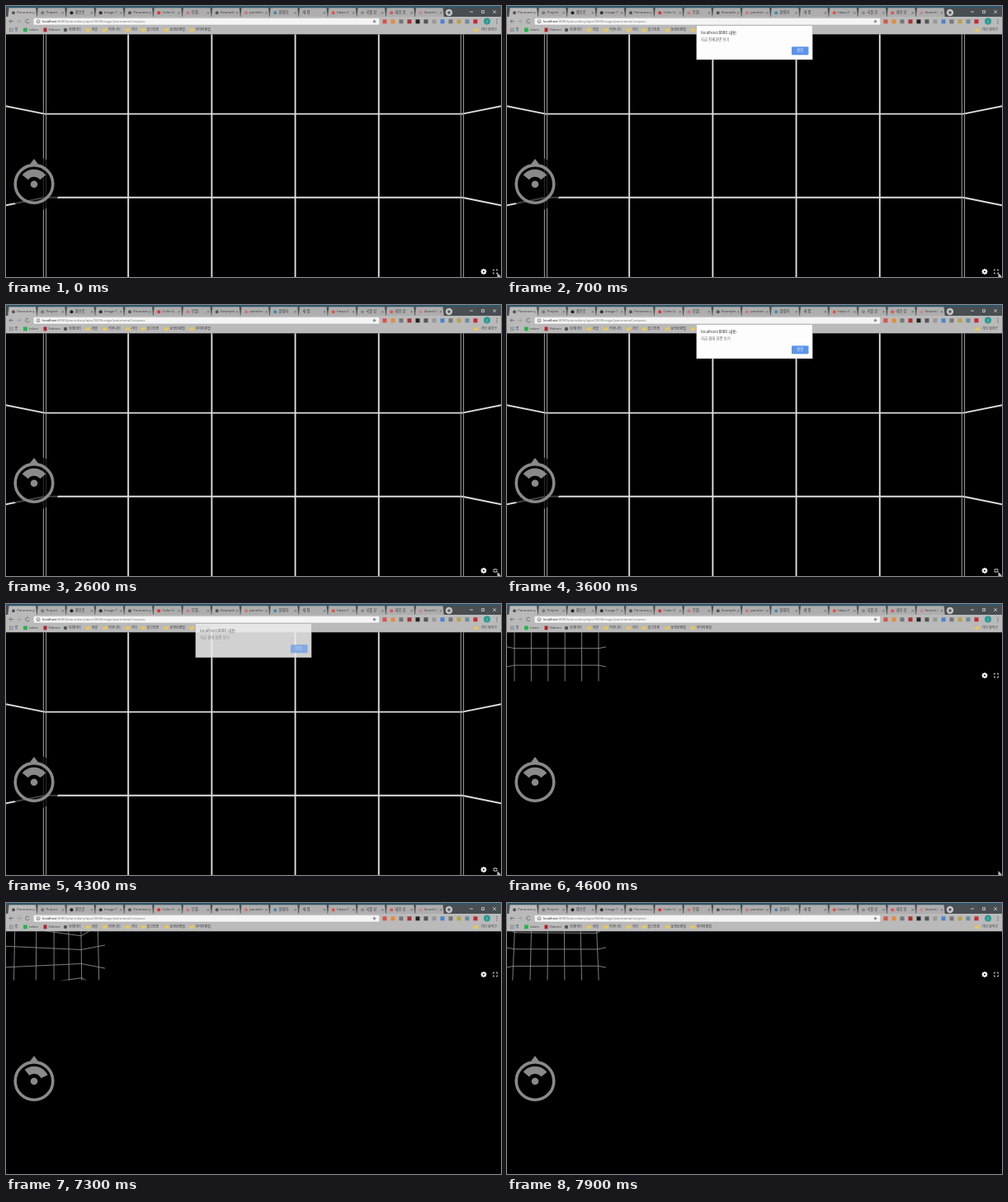
These frames come from a looping animation (600x328 px, 8 s). An HTML page with a canvas:

```html
<!DOCTYPE html>
<html lang="ko">
<head>
<meta charset="utf-8">
<title>Panorama viewer</title>
<style>
html, body { margin: 0; width: 100%; height: 100%; overflow: hidden; background: #000; }
canvas { display: block; width: 600px; height: 328px; }
</style>
</head>
<body>
<canvas id="stage" width="600" height="328"></canvas>
<script>
const ctx = document.getElementById('stage').getContext('2d');
const LOOP = 8000;
const STEP = 100;
const FONT = '"Open Sans", "Noto Sans CJK KR", "Noto Sans CJK", sans-serif';

const clamp = v => Math.max(0, Math.min(1, v));
const ramp = (t, from, to) => clamp((t - from) / (to - from));

function rect(x, y, w, h, color) {
  ctx.fillStyle = color;
  ctx.fillRect(x, y, w, h);
}

function disc(x, y, r, color) {
  ctx.fillStyle = color;
  ctx.beginPath();
  ctx.arc(x, y, r, 0, Math.PI * 2);
  ctx.fill();
}

function poly(points, color) {
  ctx.fillStyle = color;
  ctx.beginPath();
  points.forEach(([x, y]) => ctx.lineTo(x, y));
  ctx.closePath();
  ctx.fill();
}

function line(points, color, width) {
  ctx.strokeStyle = color;
  ctx.lineWidth = width;
  ctx.beginPath();
  points.forEach(([x, y], i) => i ? ctx.lineTo(x, y) : ctx.moveTo(x, y));
  ctx.stroke();
}

function arc(x, y, r, from, to, color, width) {
  ctx.strokeStyle = color;
  ctx.lineWidth = width;
  ctx.beginPath();
  ctx.arc(x, y, r, from, to);
  ctx.stroke();
}

function round(x, y, w, h, r, color) {
  ctx.fillStyle = color;
  ctx.beginPath();
  ctx.roundRect(x, y, w, h, r);
  ctx.fill();
}

function text(str, x, y, size, color, align = 'left') {
  ctx.font = `${size}px ${FONT}`;
  ctx.textAlign = align;
  ctx.textBaseline = 'middle';
  ctx.fillStyle = color;
  ctx.fillText(str, x, y);
}

// Browser window

const TABS = [
  ['Panoram', '#555'], ['Project', '#777'], ['웹프로', '#222'], ['Image T', '#333'],
  ['Panoram', '#555'], ['Color U', '#d33'], ['모델 - ', '#c77'], ['Example', '#555'],
  ['panolen', '#c77'], ['알림차', '#48a'], ['새 탭', null], ['https://', '#d54'],
  ['국룰 상', '#888'], ['데모 상', '#d55'], ['Search I', '#c88']
];

function drawTabs() {
  rect(0, 0, 600, 2, '#2b566e');
  rect(0, 2, 600, 11.5, '#484e52');

  TABS.forEach(([label, icon], i) => {
    const x = 2 + i * 35.25;
    poly([[x, 13.5], [x + 1.4, 2], [x + 34.2, 2], [x + 35.6, 13.5]], '#747474');
    poly([[x + 0.5, 13.5], [x + 1.7, 2.5], [x + 33.9, 2.5], [x + 35.1, 13.5]], i ? '#aeaeae' : '#bababa');
    if (icon) disc(x + 7, 8.3, 2, icon);
    text(label, x + (icon ? 11.2 : 5), 8.3, 4.3, '#3a3a3a');
    const cx = x + 31.5;
    line([[cx - 1.2, 7.1], [cx + 1.2, 9.5]], '#555', 0.6);
    line([[cx + 1.2, 7.1], [cx - 1.2, 9.5]], '#555', 0.6);
  });

  disc(537, 8, 4.2, '#c4c4c4');
  line([[535, 8], [539, 8]], '#333', 0.9);
  line([[537, 6], [537, 10]], '#333', 0.9);
  line([[562, 7], [566, 7]], '#ddd', 0.8);
  ctx.strokeStyle = '#ddd';
  ctx.lineWidth = 0.8;
  ctx.strokeRect(576.7, 5.7, 2.8, 2.8);
  line([[590.3, 5.2], [594, 8.9]], '#ddd', 0.8);
  line([[594, 5.2], [590.3, 8.9]], '#ddd', 0.8);
}

function drawToolbar() {
  rect(0, 13, 600, 21.3, '#bababa');
  line([[9, 18.5], [4, 18.5], [6.3, 16.2]], '#666', 0.8);
  line([[4, 18.5], [6.3, 20.8]], '#666', 0.8);
  line([[13, 18.5], [18, 18.5], [15.7, 16.2]], '#999', 0.8);
  line([[18, 18.5], [15.7, 20.8]], '#999', 0.8);
  arc(26, 18.5, 2.3, 0.3, 5.5, '#666', 0.8);

  round(33, 14.2, 420, 9, 1.2, '#aaa');
  round(33.5, 14.7, 419, 8, 1, '#f4f4f4');
  arc(39, 18.7, 2, 0, Math.PI * 2, '#666', 0.7);
  line([[39, 18.2], [39, 20]], '#666', 0.6);
  const host = 'localhost';
  text(host, 44, 18.8, 4.25, '#222');
  const hostEnd = 44 + ctx.measureText(host).width;
  text(':8080/pianodiary/ajax/3600image/panoramaCompass', hostEnd, 18.8, 4.25, '#777');

  const star = Array.from({ length: 10 }, (_, i) => {
    const a = i * Math.PI / 5 - Math.PI / 2, r = i % 2 ? 1.1 : 2.6;
    return [446.5 + r * Math.cos(a), 18.7 + r * Math.sin(a)];
  });
  poly(star, '#888');

  const badges = ['#d65448', '#e58a3c', '#777', '#a33', '#222', '#555',
    '#999', '#4a83d0', '#777', '#b9a04a', '#6c8b9c', '#c22a35'];
  badges.forEach((c, i) => rect(456.5 + i * 10, 16.3, 5, 5, c));
  disc(583, 18.5, 4, '#2b9a94');
  text('J', 583, 18.5, 4, '#fff', 'center');
  [16.3, 18.6, 20.9].forEach(y => disc(595, y, 0.65, '#555'));
}

function drawFolder(x) {
  rect(x, 26.6, 2.4, 1, '#d1a936');
  rect(x, 27.2, 4.6, 3.8, '#e9c75a');
}

function drawBookmarks() {
  const mark = (label, x) => text(label, x, 29, 4, '#3a3a3a');
  for (let i = 0; i < 9; i++)
    rect(4 + (i % 3) * 1.7, 26.6 + Math.floor(i / 3) * 1.7, 1.2, 1.2, ['#c55', '#5a8', '#58b'][i % 3]);
  mark('앱', 10.5);
  rect(21, 26.5, 4.8, 4.8, '#25b34b');
  mark('tolum', 28);
  rect(45.5, 26.5, 4, 4.8, '#b3202a');
  mark('Vidoren', 51.5);
  disc(72, 29, 2.2, '#555');
  mark('위데이터', 76);
  [['개발', 97], ['커뮤니티', 117.5], ['기타', 145], ['알고리즘', 164],
    ['동영상편집', 192], ['이미지편집', 223]].forEach(([label, x]) => {
    drawFolder(x);
    mark(label, x + 6.5);
  });
  drawFolder(567.5);
  mark('기타 북마크', 575.5);
}

// Panorama: a square room with a five-cell grid on each wall

const HALF = 2.5;

function drawRoom(view, yaw, pitch) {
  const { cx, cy, focal, box, color, width } = view;
  const project = ([x, y, z]) => {
    const rx = x * Math.cos(yaw) - z * Math.sin(yaw);
    const rz = x * Math.sin(yaw) + z * Math.cos(yaw);
    const ry = y * Math.cos(pitch) - rz * Math.sin(pitch);
    const depth = y * Math.sin(pitch) + rz * Math.cos(pitch);
    return [cx + focal * rx / depth, cy - focal * ry / depth];
  };
  const edge = (a, b, c = color, w = width) => line([project(a), project(b)], c, w);

  ctx.save();
  ctx.beginPath();
  ctx.rect(...box);
  ctx.clip();
  rect(...box, '#000');
  for (const y of [-1.5, -0.5, 0.5, 1.5]) {
    edge([-HALF, y, HALF], [HALF, y, HALF]);
    for (const x of [-HALF, HALF]) edge([x, y, HALF], [x, y, 1]);
  }
  for (const x of [-1.5, -0.5, 0.5, 1.5]) edge([x, -HALF, HALF], [x, HALF, HALF]);
  for (const x of [-HALF, HALF]) {
    edge([x, -HALF, 1.5], [x, HALF, 1.5]);
    if (view.split) {
      for (const d of [-0.016, 0.016]) edge([x + d, -HALF, HALF], [x + d, HALF, HALF], '#a0a0a0', 1);
    } else {
      edge([x, -HALF, HALF], [x, HALF, HALF]);
    }
  }
  ctx.restore();
}

const FULL = { cx: 300, cy: 181.2, focal: 253, box: [0, 34.3, 600, 293.7], color: '#dedede', width: 1.9, split: true };
const MINI = { cx: 60, cy: 63.9, focal: 51, box: [0, 34.3, 120, 59.2], color: '#8c8c8c', width: 0.9 };

function drawCompass(yaw, shaded) {
  const x = 34, y = 215.4, color = '#8a8a8a';
  if (shaded) disc(x, y, 33, 'rgba(0,0,0,0.72)');
  arc(x, y, 22.8, 0, Math.PI * 2, color, 3.6);
  poly([[x, 185], [x + 5, 191.6], [x - 5, 191.6]], color);
  const up = yaw - Math.PI / 2;
  arc(x, y + 0.6, 13.8, up - 0.9, up + 0.9, color, 9);
  disc(x, y + 0.4, 4.3, color);
}

function drawControls(y, expanded) {
  for (let i = 0; i < 8; i++) {
    const a = i * Math.PI / 4;
    line([[579, y], [579 + 3.5 * Math.cos(a), y + 3.5 * Math.sin(a)]], '#fff', 1.5);
  }
  disc(579, y, 2.8, '#fff');
  disc(579, y, 1.1, '#000');
  const tip = expanded ? 0.9 : 2.4, arm = expanded ? 2.6 : 0.9;
  for (const sx of [-1, 1]) for (const sy of [-1, 1])
    line([[593 + sx * arm, y + sy * tip], [593 + sx * tip, y + sy * tip],
      [593 + sx * tip, y + sy * arm]], '#eee', 0.9);
}

function drawAlert(message, alpha) {
  if (alpha <= 0) return;
  ctx.save();
  ctx.globalAlpha = alpha;
  rect(229.5, 23.5, 141, 41.5, '#bbb');
  rect(230, 24, 140, 40.5, '#fdfdfd');
  text('localhost:8080 내용:', 235, 32.3, 4.8, '#333');
  text(message, 235, 41.2, 4.4, '#666');
  round(345, 49.3, 20.5, 10, 1, '#5c94ea');
  text('확인', 355.2, 54.4, 4.2, '#fff', 'center');
  ctx.restore();
}

function drawCursor() {
  poly([[595.5, 323], [595.5, 328], [599.5, 328], [599, 326.6]], '#bbb');
}

function draw(t) {
  const mini = t >= 4400;
  const expanded = t >= 1700 && !mini;
  const drag = ramp(t, 6700, 7700);
  const yaw = 0.24 * Math.sin(Math.PI * drag) + 0.01 * drag;
  const pitch = 0.042 * ramp(t, 6700, 7900);

  rect(0, 0, 600, 328, '#000');
  drawRoom(mini ? MINI : FULL, yaw, pitch);
  drawCompass(yaw, !mini);
  drawControls(mini ? 86.5 : 321.5, expanded);
  drawTabs();
  drawToolbar();
  drawBookmarks();
  drawAlert('지금 전체화면 보기', ramp(t, 300, 700) * (1 - ramp(t, 1500, 1800)));
  drawAlert('지금 원래 화면 보기', ramp(t, 2900, 3300) * (1 - ramp(t, 4200, 4500)));
  if (t < 5800) drawCursor();
}

const start = performance.now();
function tick() {
  const t = (performance.now() - start) % LOOP;
  draw(Math.floor(t / STEP) * STEP);
  requestAnimationFrame(tick);
}
tick();
</script>
</body>
</html>
```
